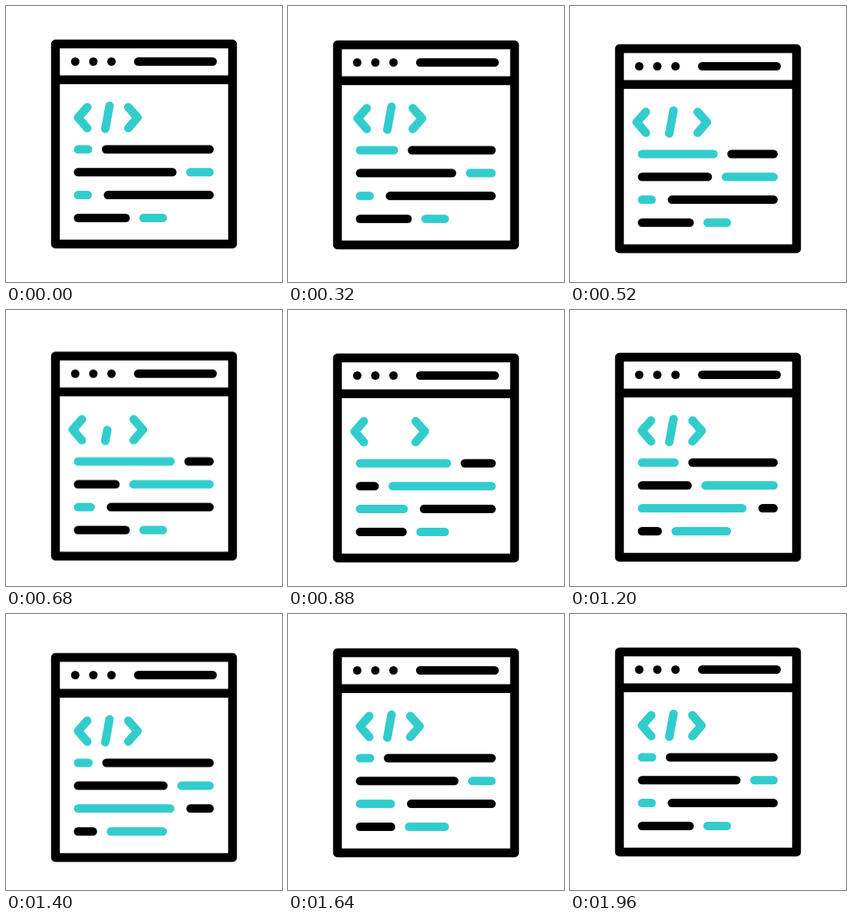
Write an HTML page that moves like this. It is 360 by 360 pixels and loops after 2000 ms.

```html
<!DOCTYPE html>
<html lang="en">
<head>
<meta charset="utf-8">
<title>Code window</title>
<style>
  @property --shift { syntax: "<length>"; inherits: true; initial-value: 0px; }

  html, body { margin: 0; width: 100%; height: 100%; overflow: hidden; background: #fff; }
  svg { display: block; width: 100vw; height: 100vh; }

  .window {
    --ease: cubic-bezier(.3333, 0, .6667, 1);
    fill: none; stroke: #000; stroke-width: 11;
    stroke-linecap: round; stroke-linejoin: round;
    animation: bob 2s var(--ease) infinite;
  }
  .dots { fill: #000; stroke: none; }
  .teal { stroke: #33cccc; }

  /* Each row is two bars sharing a gap that slides by --shift. */
  .row { animation: 2s var(--ease) infinite; }
  .left { stroke-dasharray: calc(var(--left) + var(--shift)) 400px; }
  .right { stroke-dasharray: calc(var(--right) - var(--shift)) 400px; }
  .row1 { --left: 13px; --right: 135px; animation-name: row1; }
  .row2 { --left: 123px; --right: 25px; animation-name: row2; }
  .row3 { --left: 12.5px; --right: 132.5px; animation-name: row3; }
  .row4 { --left: 62px; --right: 25px; animation-name: row4; }

  .chevron { animation: spread 2s var(--ease) infinite; }
  .open { --out: -7px; }
  .close { --out: 7px; }
  .slash { stroke-dasharray: 31 100; animation: trim 2s var(--ease) infinite; }

  @keyframes bob {
    0%, 10%, 87.8%, 100% { transform: translateY(0); }
    43.4%, 54.5% { transform: translateY(13px); }
  }
  @keyframes row1 {
    0%, 4.5%, 71.5%, 100% { --shift: 0px; }
    37.5% { --shift: 111px; }
  }
  @keyframes row2 {
    0%, 12.65%, 75.75%, 100% { --shift: 0px; }
    46%, 48.25% { --shift: -105px; }
  }
  @keyframes row3 {
    0%, 30.5%, 89.8%, 100% { --shift: 0px; }
    63.8%, 64.6% { --shift: 122.5px; }
  }
  @keyframes row4 {
    0%, 37.75%, 96.25%, 100% { --shift: 0px; }
    63.25%, 67.75% { --shift: -43.5px; }
  }
  @keyframes spread {
    0%, 8%, 62%, 100% { transform: translateX(0); }
    25%, 45% { transform: translateX(var(--out)); }
  }
  @keyframes trim {
    0%, 27%, 58%, 100% { stroke-dashoffset: 0; }
    41%, 45% { stroke-dashoffset: 33; }
  }
</style>
</head>
<body>
<svg viewBox="0 0 360 360">
  <g class="window">
    <path d="M64.5 49.5H295.5V310.5H64.5ZM64.5 96.2H295.5" stroke-width="11.5"/>
    <g class="dots">
      <circle cx="90.3" cy="72.5" r="5.5"/>
      <circle cx="113.9" cy="72.5" r="5.5"/>
      <circle cx="137.6" cy="72.5" r="5.5"/>
    </g>
    <path d="M172.5 72.5H269.5"/>

    <g class="teal">
      <path class="chevron open" d="M106 132L94 145.5L106 159.3"/>
      <path class="slash" d="M129.5 160.2L135 130.2"/>
      <path class="chevron close" d="M159.5 132L171.5 145.5L159.5 159.3"/>
    </g>

    <g class="row row1">
      <path class="left teal" d="M94 187H266"/>
      <path class="right" d="M265.5 187H94"/>
    </g>
    <g class="row row2">
      <path class="left" d="M94 216.8H266"/>
      <path class="right teal" d="M265.5 216.8H94"/>
    </g>
    <g class="row row3">
      <path class="left teal" d="M94 246.6H266"/>
      <path class="right" d="M265.5 246.6H94"/>
    </g>
    <g class="row row4">
      <path class="left" d="M94 276.5H266"/>
      <path class="right teal" d="M204.5 276.5H94"/>
    </g>
  </g>
</svg>
</body>
</html>
```
